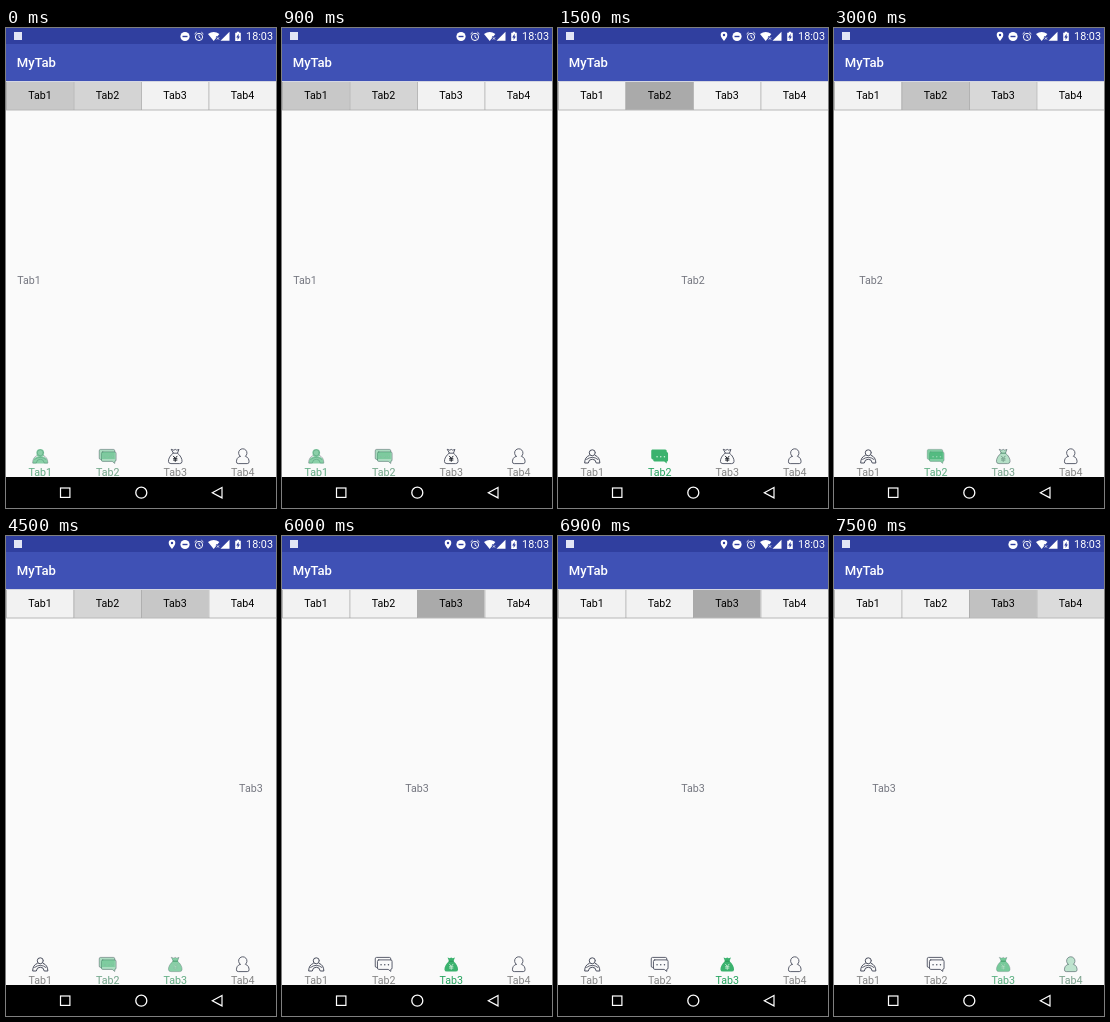
Write an HTML page with a canvas that moves like this. It is 270 px wide and 480 px high and loops after 8000 ms.

```html
<!DOCTYPE html>
<html lang="en">
<head>
<meta charset="utf-8">
<title>MyTab</title>
<style>
html, body { margin: 0; width: 100%; height: 100%; overflow: hidden; background: #fafafa; }
canvas { display: block; width: 270px; height: 480px; }
</style>
</head>
<body>
<canvas id="stage"></canvas>
<script>
const W = 270, H = 480, TAB = W / 4;
const LOOP = 8000, HOLD = 1500;
// Pager position held in each step
const POSITIONS = [0.415, 1, 1.363, 1.593, 2, 2.315];
const GREEN = '#3bb26e', LABEL_GREEN = '#26a35f', INK = '#4a4f5e';

const canvas = document.getElementById('stage');
const ratio = window.devicePixelRatio || 1;
canvas.width = W * ratio;
canvas.height = H * ratio;
const c = canvas.getContext('2d');
c.scale(ratio, ratio);

function rect(x, y, w, h, color) {
  c.fillStyle = color;
  c.fillRect(x, y, w, h);
}

function text(str, x, y, color, size = 10.67, align = 'center', weight = 400) {
  c.font = `${weight} ${size}px Roboto, sans-serif`;
  c.textAlign = align;
  c.fillStyle = color;
  c.fillText(str, x, y);
}

function fill(d, color) {
  c.fillStyle = color;
  c.fill(new Path2D(d), 'evenodd');
}

function stroke(d, color, width = 1) {
  c.strokeStyle = color;
  c.lineWidth = width;
  c.stroke(new Path2D(d));
}

function dot(x, y, r, color) {
  c.fillStyle = color;
  c.beginPath();
  c.arc(x, y, r, 0, 7);
  c.fill();
}

function ring(x, y, r, color, width = 1) {
  c.strokeStyle = color;
  c.lineWidth = width;
  c.beginPath();
  c.arc(x, y, r, 0, 7);
  c.stroke();
}

function at(x, y, alpha, draw) {
  c.save();
  c.translate(x, y);
  c.globalAlpha = alpha;
  c.lineJoin = c.lineCap = 'round';
  draw();
  c.restore();
}

const PERSON = 'M-7.5 7Q-7.5 .6-2.5 0H2.5Q7.5 .6 7.5 7Z';
const BACK_BUBBLE = 'M-7.5-7H5.5Q7-7 7-5.5V2.5H-6V4.5L-7.5 2.5Q-8.5 2.5-8.5 1V-5.5Q-8.5-7-7.5-7Z';
const FRONT_BUBBLE = 'M-5-4.5H7Q8.3-4.5 8.3-3V3.5Q8.3 5 7 5V7L4.5 5H-5Q-6.3 5-6.3 3.5V-3Q-6.3-4.5-5-4.5Z';
const BAG = 'M-3.7-7L-1.5-6.2 0-7 1.5-6.2 3.7-7 2.2-3.2C5-1.2 7 2.5 6.8 5Q6.7 7.2 4.3 7.2H-4.3Q-6.7 7.2-6.8 5C-7 2.5-5-1.2-2.2-3.2Z';
const YEN = 'M-1.8-.2L0 2 1.8-.2M0 2V5M-1.7 2.3H1.7M-1.7 3.7H1.7';
const USER = 'M-2.6-.1C-5.4 .8-6.3 3-6.3 5.4Q-6.3 7.2-4.5 7.2H4.5Q6.3 7.2 6.3 5.4C6.3 3 5.4 .8 2.6-.1A4.2 4.2 0 1 0-2.6-.1Z';

function bubbleDots(color) {
  for (const x of [-2.7, 1, 4.7]) dot(x, .4, .75, color);
}

// Each tab icon: outlined and selected look
const ICONS = [
  [() => {
    ring(0, -3.6, 3, INK);
    stroke('M-3-1Q-7.5 .6-7.6 6.6H-4Q-3.5 2.8 0 2.8T4 6.6H7.6Q7.5 .6 3-1', INK);
    stroke('M-5.6 3Q0-1.3 5.6 3', INK, .9);
  }, () => {
    dot(0, -3.4, 3.9, GREEN);
    fill(PERSON, GREEN);
  }],
  [() => {
    stroke('M-6.3 3H-7.2Q-8.5 3-8.5 1.7V-5.5Q-8.5-7-7.2-7H5.6Q7-7 7-5.5V-4.5', INK, .9);
    stroke(FRONT_BUBBLE, INK, .9);
    bubbleDots(INK);
  }, () => {
    fill(BACK_BUBBLE, GREEN);
    fill(FRONT_BUBBLE, GREEN);
    bubbleDots('#d4f0df');
  }],
  [() => {
    stroke(BAG, INK, .9);
    stroke('M-2.2-3.2H2.2', INK, .9);
    stroke(YEN, '#22252e', 1);
  }, () => {
    fill(BAG, GREEN);
    stroke('M-2.4-3.2H2.4', '#238d50', .8);
    stroke(YEN, '#c3e9d1', .9);
  }],
  [() => stroke(USER, INK, .9), () => fill(USER, GREEN)]
];

function statusBar(located) {
  rect(0, 0, W, 16, '#303f9f');
  const white = '#fff';
  rect(8, 4, 8, 8, '#e3e6f5');
  if (located) {
    fill('M166 13C164.5 10.8 162.7 9 162.7 7A3.3 3.3 0 0 1 169.3 7C169.3 9 167.5 10.8 166 13ZM164.8 7A1.2 1.2 0 1 0 167.2 7A1.2 1.2 0 1 0 164.8 7Z', white);
  }
  dot(179, 8.5, 4.6, white);
  rect(176.5, 7.8, 5, 1.4, '#303f9f');
  ring(193, 8.9, 3.6, white);
  stroke('M193 6.8V9.2L194.7 10.2M188.6 6L190.6 4.2M197.4 6L195.4 4.2', white, .9);
  fill('M202 6Q207.7 2 213.4 6L207.7 13Z', white);
  stroke('M210.2 8.6L213.4 11.8M213.4 8.6L210.2 11.8', '#303f9f', 1.6);
  stroke('M210.8 9.4L213 11.6M213 9.4L210.8 11.6', white, .8);
  fill('M214.5 12.8H223.5V3.8Z', white);
  fill('M229.2 4.8H230.8V3.8H233.2V4.8H234.8V13H229.2ZM232.6 5.8L230.2 9.4H231.6V12L233.9 8.4H232.6Z', white);
  text('18:03', 267, 12.2, white, 10.8, 'right');
}

function topTabs(levels) {
  levels.forEach((s, i) => {
    const g = Math.round(242 - 72 * s);
    rect(i * TAB, 53, TAB, 29, `rgb(${g},${g},${g})`);
    text('Tab' + (i + 1), (i + .5) * TAB + .3, 71, '#000');
  });
  rect(0, 53, W, 1, '#d5d7e2');
  rect(0, 81.5, W, 1, '#b9b9b9');
  for (let i = 0; i < 4; i++) rect(i * TAB, 54, .8, 28, '#a9a9a9');
}

function bottomTabs(levels) {
  levels.forEach((s, i) => {
    const x = (i + .5) * TAB + .5, label = 'Tab' + (i + 1);
    const [plain, active] = ICONS[i];
    at(x, 428.4, 1 - s, () => {
      plain();
      text(label, 0, 19.5, '#858585');
    });
    at(x, 428.4, s, () => {
      active();
      text(label, 0, 19.5, LABEL_GREEN);
    });
  });
}

function navBar() {
  rect(0, 449, W, 31, '#000');
  c.strokeStyle = '#fff';
  c.lineWidth = 1.2;
  c.strokeRect(54.5, 460, 9.4, 9.4);
  ring(135.3, 464.7, 5.5, '#fff', 1.3);
  stroke('M206.3 464.7L216 459.5V469.9Z', '#fff', 1.2);
}

function draw(now) {
  const step = Math.floor((now % LOOP) / HOLD);
  const pos = POSITIONS[step];
  const levels = [0, 1, 2, 3].map(i => Math.max(0, 1 - Math.abs(i - pos)));

  rect(0, 0, W, H, '#fafafa');
  levels.forEach((s, i) => {
    if (s) text('Tab' + (i + 1), W / 2 + (i - pos) * W, 255.7, '#757780');
  });
  rect(0, 16, W, 37, '#3f51b5');
  text('MyTab', 10.7, 39.3, '#fff', 13.1, 'left', 500);
  statusBar(step > 0 && step < 5);
  topTabs(levels);
  bottomTabs(levels);
  navBar();
}

const start = performance.now();
function tick() {
  draw(performance.now() - start);
  requestAnimationFrame(tick);
}
tick();
</script>
</body>
</html>
```
